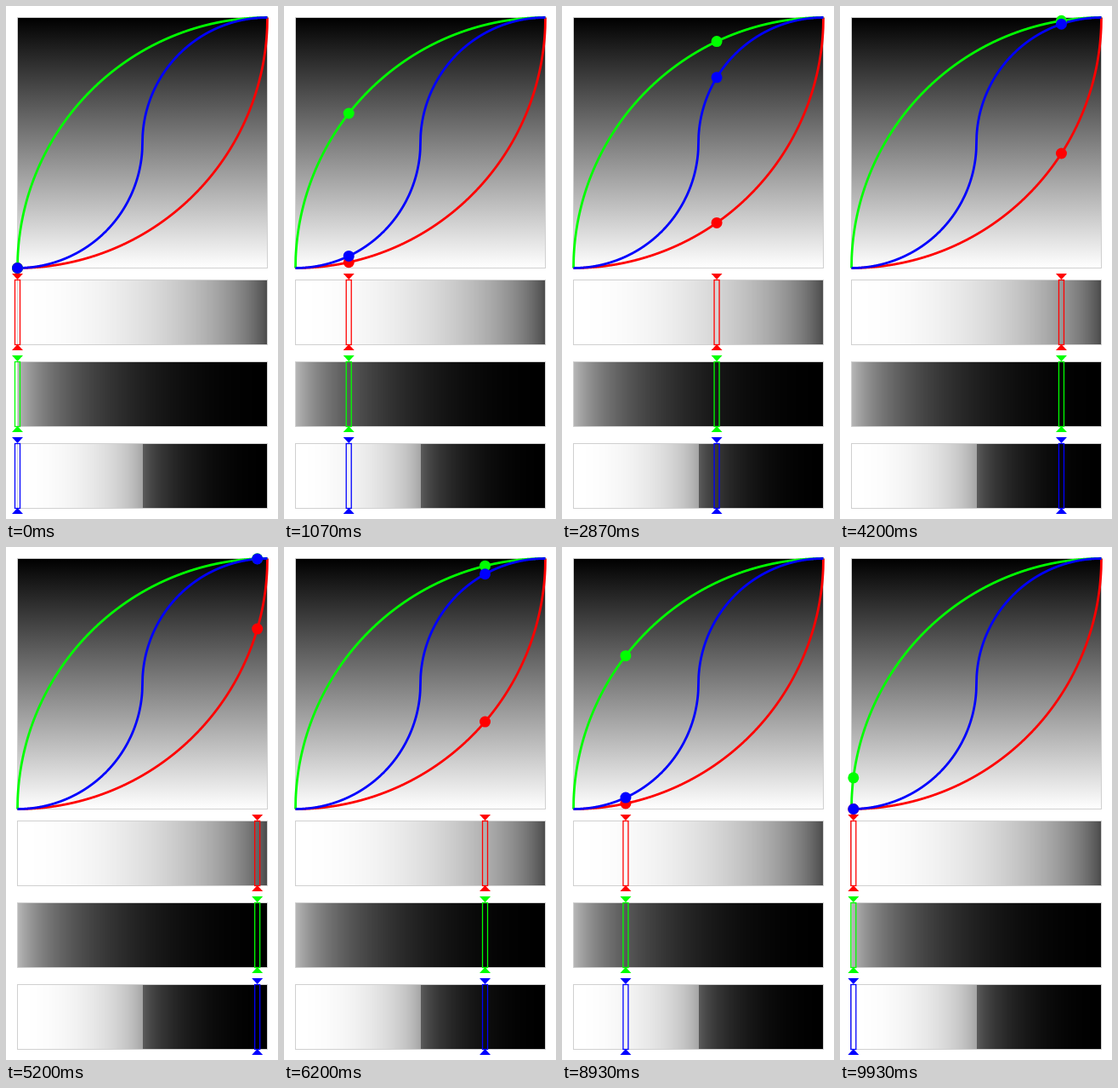
An HTML page with a canvas that plays this animation: 320 by 602 pixels, repeating every 9.99 s.

```html
<!DOCTYPE html>
<html lang="en">
<head>
<meta charset="utf-8">
<style>
html, body { margin: 0; height: 100%; overflow: hidden; background: #fff; }
canvas { display: block; }
</style>
</head>
<body>
<canvas id="stage" width="320" height="602"></canvas>
<script>
const ctx = document.getElementById('stage').getContext('2d');
const LEFT = 13, SIZE = 294, LOOP = 9990, TAU = Math.PI * 2;
const arc = d => Math.sqrt(Math.max(0, 1 - d * d));

// Each curve maps 0..1 to 0..1; "k" below 1 softens its vertical ends.
const easeIn = (u, k = 1) => 1 - arc(u * k);
const easeOut = (u, k = 1) => arc((1 - u) * k);
const easeInOut = (u, k = 1) => u < 0.5 ? easeIn(u * 2, k) / 2 : (1 + easeOut(u * 2 - 1, k)) / 2;
const tracks = [
  { color: '#f00', ease: easeIn, top: 321 },
  { color: '#0f0', ease: easeOut, top: 417 },
  { color: '#00f', ease: easeInOut, top: 513 }
];
const STRIP = 76;
const plotY = v => LEFT + SIZE * (1 - v);

function frame(x, y, w, h) {
  ctx.strokeStyle = '#d0d0d0';
  ctx.lineWidth = 1;
  ctx.strokeRect(x, y, w, h);
}

function triangle(x, base, tip) {
  ctx.beginPath();
  ctx.moveTo(x - 6.5, base);
  ctx.lineTo(x + 6.5, base);
  ctx.lineTo(x, tip);
  ctx.fill();
}

function drawPlot() {
  const shade = ctx.createLinearGradient(0, LEFT, 0, LEFT + SIZE);
  shade.addColorStop(0, '#000');
  shade.addColorStop(1, '#fff');
  ctx.fillStyle = shade;
  ctx.fillRect(LEFT, LEFT, SIZE, SIZE);
  frame(LEFT, LEFT, SIZE, SIZE);
}

function drawStrip({ ease, top }) {
  for (let i = 0; i < SIZE; i++) {
    const grey = Math.round(255 * (1 - ease((i + 0.5) / SIZE, 0.96)));
    ctx.fillStyle = `rgb(${grey},${grey},${grey})`;
    ctx.fillRect(LEFT + i + 0.5, top, 1, STRIP);
  }
  frame(LEFT, top, SIZE, STRIP);
}

function drawCurve({ color, ease }) {
  ctx.beginPath();
  for (let i = 0; i <= SIZE * 4; i++) {
    const u = i / (SIZE * 4);
    ctx.lineTo(LEFT + SIZE * u, plotY(ease(u)));
  }
  ctx.strokeStyle = color;
  ctx.lineWidth = 2.8;
  ctx.stroke();
}

function drawMarker({ color, ease, top }, x) {
  const bottom = top + STRIP;
  ctx.fillStyle = ctx.strokeStyle = color;
  ctx.lineWidth = 1.3;
  ctx.strokeRect(x - 3, top, 6, STRIP);
  triangle(x, top - 7.5, top - 0.5);
  triangle(x, bottom + 6.5, bottom - 0.5);
  ctx.beginPath();
  ctx.arc(x, plotY(ease((x - LEFT) / SIZE)), 6.5, 0, TAU);
  ctx.fill();
}

function position(time) {
  const step = Math.floor((time + 5) * 15 / 1000) % 150;
  return step <= 75 ? LEFT + SIZE * step / 75 : LEFT + SIZE - 3.942 * (step - 75);
}

function draw(now) {
  const x = position(now % LOOP);
  ctx.setTransform(1, 0, 0, 1, 0, 0);
  ctx.fillStyle = '#fff';
  ctx.fillRect(0, 0, 320, 602);
  ctx.translate(0.5, 0.5);
  drawPlot();
  tracks.forEach(drawStrip);
  tracks.forEach(drawCurve);
  tracks.forEach(track => drawMarker(track, x));
}

const start = performance.now();
function tick() {
  draw(performance.now() - start);
  requestAnimationFrame(tick);
}
tick();
</script>
</body>
</html>
```
